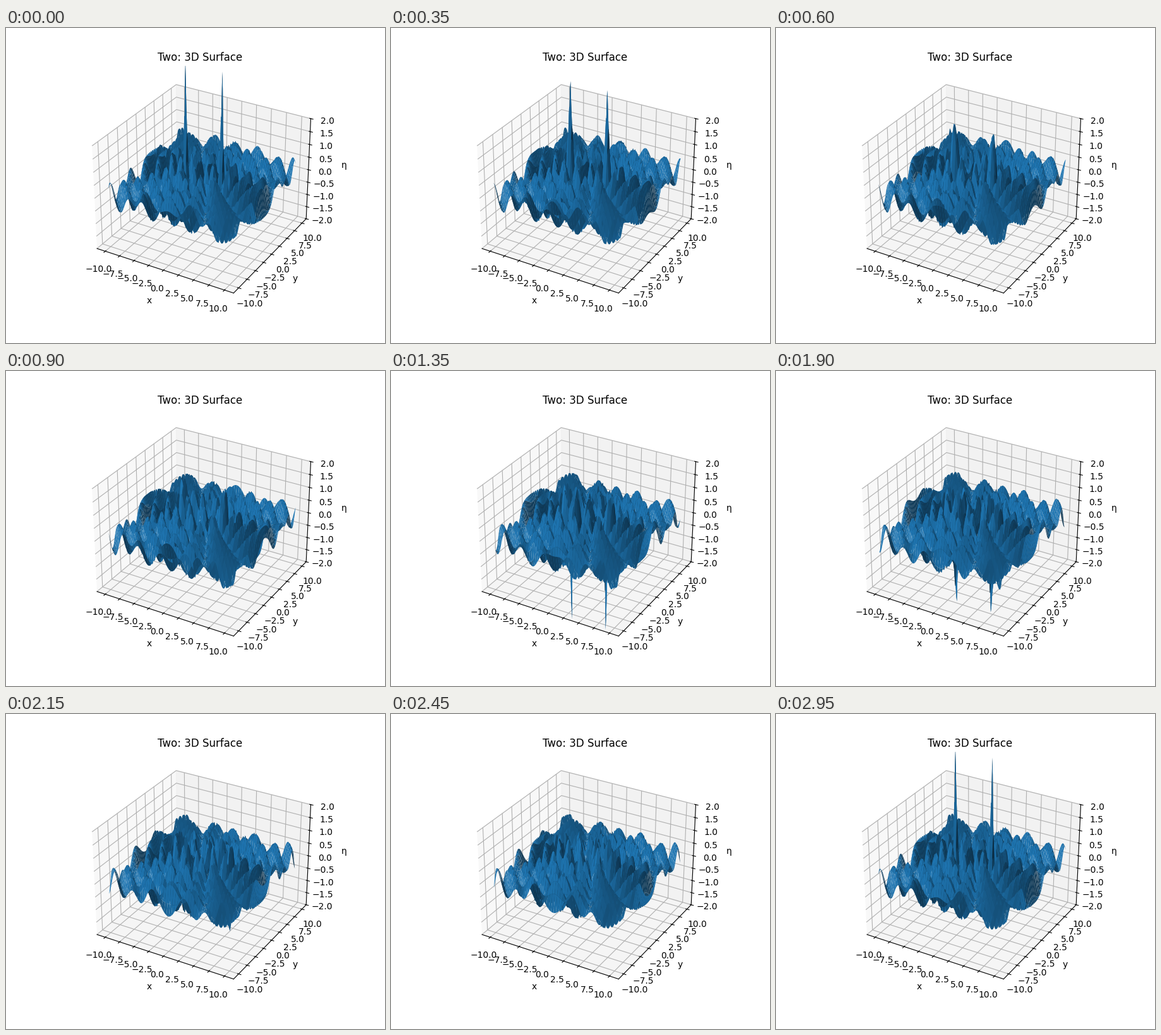
A matplotlib script that plays this animation: 600x500 px, repeating every 3000 ms.

```python
import matplotlib.pyplot as plt
import numpy as np
from matplotlib.animation import FuncAnimation
from mpl_toolkits.mplot3d.art3d import Poly3DCollection

FRAMES = 60
INTERVAL = 50
N = 200          # samples per side
STRIDE = 4       # samples per facet
K = np.pi        # wavenumber
SOURCES = (-3, 3)

axis = np.linspace(-10, 10, N)
X, Y = np.meshgrid(axis, axis)
RADII = [np.hypot(X - sx, Y) for sx in SOURCES]


def perimeter(a):
    """Outer cells of a 2D array, in order around the edge."""
    return np.concatenate([a[0, :-1], a[:-1, -1], a[-1, :0:-1], a[:0:-1, 0]])


def facet_rings():
    index = np.arange(N * N).reshape(N, N)
    cuts = [*range(0, N - 1, STRIDE), N - 1]
    spans = [slice(a, b + 1) for a, b in zip(cuts, cuts[1:])]
    return [perimeter(index[rows, cols]) for rows in spans for cols in spans]


RINGS = facet_rings()


def height(phase):
    return sum(np.cos(K * r - phase) / np.sqrt(r) for r in RADII)


def surface(phase):
    points = np.column_stack([X.ravel(), Y.ravel(), height(phase).ravel()])
    return Poly3DCollection([points[ring] for ring in RINGS],
                            facecolors="C0", shade=True)


fig = plt.figure(figsize=(6, 5), dpi=100)
ax = fig.add_subplot(projection="3d")
limit = 11 * 25 / 24
ax.set_xlim(-limit, limit)
ax.set_ylim(-limit, limit)
ax.set_zlim(-2, 2)
ax.set_title("Two: 3D Surface")
ax.set_xlabel("x")
ax.set_ylabel("y")
ax.set_zlabel("η")


def update(i):
    for old in list(ax.collections):
        old.remove()
    # the last frame closes the full period
    ax.add_collection3d(surface(2 * np.pi * i / (FRAMES - 1)))
    return []


anim = FuncAnimation(fig, update, frames=FRAMES, interval=INTERVAL,
                     repeat=True, repeat_delay=0, blit=False)
plt.show()
```
